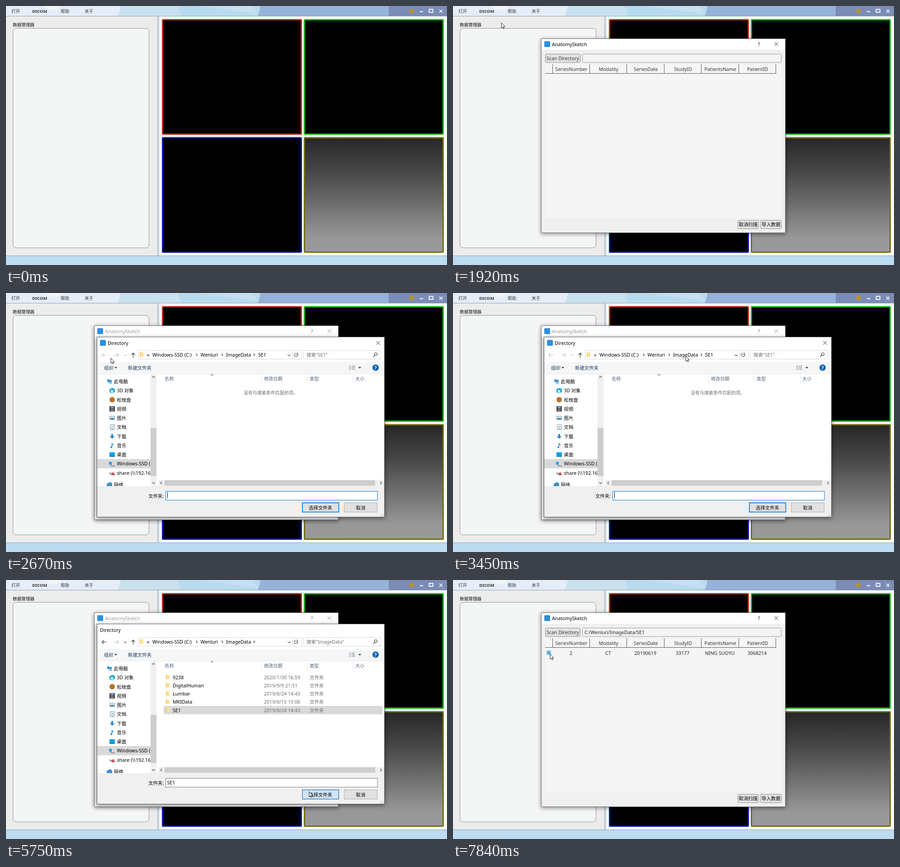
Recreate the animation shown at these times as an HTML page. Size 976x574 px, loop 8 s.

```html
<!DOCTYPE html>
<html lang="zh">
<head>
<meta charset="utf-8">
<title>DICOM</title>
<style>
html, body { margin: 0; height: 100%; overflow: hidden; }
svg { display: block; }
#stage { width: 100%; height: 100%; font: 10.6px "Noto Sans", "Noto Sans CJK SC", "Noto Sans CJK", sans-serif; }
text { white-space: pre; }
.zh { font-size: 10.4px; }
.menu { font-size: 9.6px; font-weight: 500; fill: #333; }
.head { font-size: 10.2px; fill: #4c607a; }
.mid { text-anchor: middle; }
.shadow { filter: drop-shadow(0 2px 5px #0007); }
</style>
</head>
<body>
<svg id="stage" viewBox="0 0 976 574" preserveAspectRatio="none"></svg>
<script>
const LOOP = 8000, STEP = 109, OFFSET = 170;
const USER = 'Wenluri';

// Cursor path: step, x, y
const track = [
  [0, 690, 508], [7, 21, 25], [8, 24, 12], [9, 25, 14], [10, 25, 14], [11, 45, 12], [13, 62, 9], [15, 62, 9],
  [18, 236, 118], [19, 220, 142], [21, 220, 142], [26, 337, 165], [29, 556, 148], [30, 515, 140], [32, 513, 138],
  [33, 513, 138], [38, 444, 288], [40, 444, 288], [47, 640, 458], [48, 671, 469], [51, 671, 469],
  [54, 526, 337], [56, 526, 337], [62, 213, 146], [64, 212, 153], [67, 212, 158], [70, 215, 164], [72, 215, 164]
];

const text = (x, y, s, attrs = '') => `<text x="${x}" y="${y}" ${attrs}>${s}</text>`;
const zh = (x, y, s, attrs = '') => text(x, y, s, `class="zh" ${attrs}`);
const mid = (x, y, s, attrs = '') => text(x, y, s, `class="mid" ${attrs}`);
const rect = (x, y, w, h, fill, attrs = '') => `<rect x="${x}" y="${y}" width="${w}" height="${h}" fill="${fill}" ${attrs}/>`;
const box = (x, y, w, h, fill, stroke, r = 0) => rect(x, y, w, h, fill, `stroke="${stroke}" rx="${r}"`);
const disc = (x, y, r, fill) => `<circle cx="${x}" cy="${y}" r="${r}" fill="${fill}"/>`;
const shape = (d, fill) => `<path d="${d}" fill="${fill}"/>`;
const line = (d, stroke, width = 1) => `<path d="${d}" fill="none" stroke="${stroke}" stroke-width="${width}"/>`;
const close = (x, y, stroke, r = 4, width = 1) =>
  line(`M${x - r} ${y - r}l${2 * r} ${2 * r}m0 ${-2 * r}l${-2 * r} ${2 * r}`, stroke, width);
const chevron = (x, y, angle, stroke = '#555', r = 3) =>
  `<path d="M${-r} ${-r / 2}L0 ${r / 2}L${r} ${-r / 2}" transform="translate(${x} ${y}) rotate(${angle})" fill="none" stroke="${stroke}" stroke-width="1.2"/>`;
const clip = (x, y, w, h, content) =>
  `<svg x="${x}" y="${y}" width="${w}" height="${h}" viewBox="${x} ${y} ${w} ${h}">${content}</svg>`;

const icons = {
  folder: (x, y) => rect(x - 4, y - 5, 8, 10, '#ffe394') + rect(x - 4, y - 5, 2, 10, '#f2cb62'),
  desktop: (x, y) => rect(x - 6, y - 5, 12, 9, '#159fe8') + rect(x - 6, y + 3, 12, 2, '#0d72b8'),
  download: (x, y) => shape(`M${x - 2} ${y - 5}h4v5h3.5l-5.5 5.5l-5.5-5.5h3.5z`, '#2d86d4'),
  doc: (x, y) => box(x - 4, y - 5.5, 9, 11, '#f8fbfd', '#8195a5') + line(`M${x - 2} ${y - 2}h5m-5 3h5m-5 3h5`, '#5b9bc8'),
  picture: (x, y) => box(x - 5.5, y - 4, 11, 8, '#dcebf2', '#8296a3') + rect(x - 4, y, 8, 3, '#3e7f9d'),
  music: (x, y) => disc(x - 2, y + 4, 2, '#198fd9') + line(`M${x - .5} ${y + 4}v-9q1 3 4 4`, '#198fd9', 1.5),
  video: (x, y) => rect(x - 6, y - 6, 12, 12, '#444c58') + rect(x - 3, y - 5, 6, 4, '#7ba5d4') + rect(x - 3, y + 1, 6, 4, '#a37b66'),
  cube: (x, y) => shape(`M${x - 6} ${y - 3}l6-3l6 2v7l-6 3l-6-2z`, '#25aadf') + shape(`M${x - 3} ${y - 1}h5v6l-5-1z`, '#d9f5fd'),
  nut: (x, y) => disc(x, y, 6, '#b8722c'),
  cloud: (x, y) => disc(x, y, 5, '#1279cf'),
  pc: (x, y) => shape(`M${x - 5} ${y - 5}l10 2v6l-10-2z`, '#3a9bdc') + line(`M${x - 2} ${y + 4}l8 1`, '#8b9aa5', 1.5),
  disk: (x, y) => rect(x - 7, y - 4, 6, 6, '#1b9ee5') + line(`M${x - 4} ${y + 3}l5 2h5`, '#888', 2),
  share: (x, y) => line(`M${x - 6} ${y}l6 4h6`, '#89939a', 3) + close(x + 2, y + 2, '#d23324', 2.5, 1.8),
  network: (x, y) => shape(`M${x - 6} ${y - 2}l8-4l4 4v6l-7 2l-5-3z`, '#3c8fc6')
};

function viewport(x, y, color, fill) {
  return rect(x + 1.5, y + 1.5, 307, 253.5, fill, `stroke="${color}" stroke-width="3" rx="1.5"`);
}

function mainWindow(k) {
  const hover = k >= 8 && k <= 10 ? [0, 43] : k >= 11 && k <= 15 ? [45.5, 59] : null;
  const menu = [[12, '打开'], [58, 'DICOM'], [121, '帮助'], [174, '关于']];
  return `<linearGradient id="gray" x2="0" y2="1"><stop stop-color="#272727"/><stop offset=".3" stop-color="#474747"/>
    <stop offset=".87" stop-color="#979797"/><stop offset="1" stop-color="#9a9a9a"/></linearGradient>`
    + rect(0, 0, 976, 574, '#f7fafa') + rect(0, 0, 976, 22, '#e5edf8')
    + shape('M82 0H123Q120 10 100 9Z', '#f2f5f4')
    + shape('M254 0H390V22H247Q252 14 254 0', '#c9e1ef')
    + shape('M380 0H570V22H387Z', '#b8daee') + shape('M430 0H545L559 18Z', '#c5e0f1')
    + shape('M563 0H847V22H557Q562 12 563 0', '#95b2d9') + rect(847, 0, 129, 22, '#7b8cb6')
    + disc(897.5, 11, 5, '#b9961f') + line('M916 12.5h7', '#fff', 2) + close(962.5, 11.5, '#fff', 3.5, 1.5)
    + `<path d="M936.5 7.5h8.500v6.500h-8.500z" fill="none" stroke="#fff" stroke-width="1.800"/>`
    + (hover ? box(hover[0], 2.5, hover[1], 17.5, '#a9d7e6', '#86c3d8', 2) : '')
    + menu.map(([x, s]) => text(x, 15, s, `class="menu" ${s === 'DICOM' ? 'style="font-weight:600;font-size:9.5px"' : ''}`)).join('')
    + rect(0, 23, 335, 530, '#ececec') + line('M0 22.500H976M0 553.500H976', '#8fa5b2')
    + rect(335, 23, 3, 530, '#d5e8f0') + line('M335.500 23V553M338 23V553', '#8b9da7', .8)
    + rect(0, 554, 976, 20, '#bbdcf1')
    + text(15, 45, '数据管理器', 'class="menu" style="fill:#111"')
    + box(15.5, 49.5, 301, 486.500, '#f4f6f5', '#8493a0', 7)
    + viewport(345, 29, '#b92b10', '#000') + viewport(659, 29, '#14b516', '#000')
    + viewport(345, 290.5, '#0a1ba6', '#000') + viewport(659, 290.5, '#75700c', 'url(#gray)');
}

function scanDialog(k) {
  const active = k < 19 || k >= 52, loaded = k >= 52, ink = active ? '#000' : '#999';
  const heads = ['SeriesNumber', 'Modality', 'SeriesDate', 'StudyID', 'PatientsName', 'PatientID'];
  const values = ['2', 'CT', '20190619', '33177', 'NING SUOYU', '3068214'];
  const columnX = i => 262 + i * 82.4;
  let s = rect(195.5, 72.5, 540, 430, '#f0f0f0', 'stroke="#777" class="shadow"') + rect(196, 73, 539, 24, '#fff')
    + rect(202, 78, 13, 13, '#2f8fdc', 'rx="2"') + text(219, 88.5, 'AnatomySketch', `fill="${ink}"`)
    + mid(677, 88.5, '?', `fill="${active ? '#000' : '#666'}"`) + close(715.5, 84.5, active ? '#222' : '#888')
    + box(204.5, 106.5, 77, 18.500, '#e3e3e3', '#8c8c8c', 2) + text(207, 119.5, 'Scan Directory', 'fill="#333"')
    + box(286.5, 106.5, 440, 18.500, '#f4f4f4', '#999', 2)
    + rect(204, 129, 523, 341, '#f5f5f5') + line('M204 149.500H715.500', '#555')
    + heads.map((h, i) => mid(columnX(i), 144, h, 'fill="#333"')).join('');
  for (let i = 0; i < 7; i++) s += line(`M${Math.floor(220 + i * 82.45) + .5} 129V149`, '#555');
  if (loaded) {
    s += text(291, 119.5, `C:/${USER}/ImageData/SE1`, 'fill="#222"')
      + values.map((v, i) => mid(columnX(i) - 1, 165.5, v, 'fill="#222"')).join('')
      + box(207.5, 156.5, 9, 9, '#fff', k >= 64 ? '#5db4e6' : '#999')
      + (k >= 67 ? rect(209, 158, 6, 6, '#259fe0') : '');
  }
  return s + box(630.5, 475, 46, 18.500, '#e3e3e3', '#8c8c8c', 2) + box(681, 475, 46, 18.500, '#e3e3e3', '#8c8c8c', 2)
    + zh(632.5, 488, '取消扫描') + zh(683, 488, '导入数据');
}

function sidebar(k) {
  const quick = k < 22;
  const items = quick
    ? [['desktop', '桌面'], ['download', '下载'], ['doc', '文档'], ['picture', '图片'], ['folder', USER], ['folder', '9238'],
       ['folder', 'figures'], ['folder', 'markdown'], ['folder', 'markdown'], ['cloud', 'TwinShelf'], ['pc', '此电脑'], ['network', '网络']]
    : [['pc', '此电脑'], ['cube', '3D 对象'], ['nut', '松枝盘'], ['video', '视频'], ['picture', '图片'], ['doc', '文档'], ['download', '下载'],
       ['music', '音乐'], ['desktop', '桌面'], ['disk', 'Windows-SSD (C:)'], ['share', String.raw`share (\\192.16`], ['network', '网络']];
  let list = rect(202, quick ? 395 : 368, 118, 20.5, '#d9d9d9');
  items.forEach(([icon, label], i) => {
    const root = quick ? i > 8 : i === 0 || i === 11;
    const y = (quick ? 189 + (i > 8) * 6.8 + (i > 9) * 6.8 + (i > 10) * 7 : 196 + (i > 10) * 6) + i * 20.25;
    list += icons[icon](root ? 229 : 235, y) + text(root ? 238.5 : 245.5, y + 4, label, /[a-z]/.test(label) ? '' : 'class="zh"');
    if (quick && i < 5) list += line(`M308 ${y + 4}l3-3m-2-3l5 5m-3-7l4 4l-4 2`, '#777', 1.2);
  });
  return clip(202, 180, 118, 248, list) + rect(320, 179, 13, 249, '#f0f0f0')
    + (quick ? rect(320, 213, 13, 181, '#cdcdcd') : rect(320, 299, 13, 107, '#cdcdcd'))
    + chevron(326.5, 186, 180) + chevron(326.5, 421, 0);
}

function fileList(k) {
  if (k < 33) return text(526, 224.5, '没有与搜索条件匹配的项。', 'font-size="10" fill="#6d6d6d"');
  const files = [['9238', '2020/1/30 16:59'], ['DigitalHuman', '2019/9/9 21:51'], ['Lumbar', '2019/8/24 14:43'],
    ['MRIData', '2019/8/15 15:06'], ['SE1', '2019/8/24 14:43']];
  const mark = k >= 49 ? '#d9d9d9' : k >= 40 ? '#cce8ff' : k >= 38 ? '#e5f3ff' : 'none';
  return rect(349, 279, 484, 18.5, mark) + files.map(([name, date], i) => {
    const y = 215.5 + i * 18.25;
    return icons.folder(358, y - .5) + text(369, y + 4, name) + text(571, y + 4, date, 'fill="#6d6d6d"') + zh(672, y + 4, '文件夹', 'fill="#6d6d6d"');
  }).join('');
}

function nameField(k) {
  const s = box(353.5, 439.5, 468.5, 19.5, '#fff', k < 40 ? '#0078d7' : '#7a7a7a');
  if (k >= 40) return s + text(356.5, 452.5, 'SE1');
  if (k >= 33) return s + rect(356, 441, 54, 14, '#0078d7') + text(356.5, 452.5, 'ImageData', 'fill="#fff"');
  return s + ((k - 19) % 11 < 6 ? line('M357.500 441V455', '#000') : '');
}

function directoryDialog(k) {
  const opened = k >= 33, closing = k >= 51, pressed = k >= 48;
  const crumbs = [[324, 'Windows-SSD (C:)'], [430.5, USER], [487, 'ImageData']].concat(opened ? [] : [[558, 'SE1']]);
  const arrow = (x, dir, color) => line(`M${x - 5 * dir} 137.500h${10 * dir}m${-4 * dir}-4l${4 * dir} 4l${-4 * dir} 4`, color, 1.2);
  const intro = k === 19 ? 'opacity=".85" transform="translate(519.5 297) scale(.9925) translate(-519.5 -297)"' : '';
  return `<g ${intro}>`
    + rect(201.5, 97.5, 636, 399, '#fff', 'stroke="#666" class="shadow"')
    + (closing ? '' : rect(208, 104, 13, 13, '#2f8fdc', 'rx="2"') + close(823.5, 110.5, '#222'))
    + text(closing ? 208 : 225, 114.5, 'Directory')
    + arrow(217.5, -1, opened ? '#333' : '#c4c4c4') + arrow(244, 1, '#c4c4c4') + chevron(264, 138, 0, opened ? '#555' : '#bbb', 2.5)
    + line('M281.500 143v-10m-4 4l4-4l4 4', '#444', 1.3)
    + box(292.5, 127.5, 362, 19, '#fff', '#d9d9d9') + line('M634.500 128V146', '#d9d9d9') + icons.folder(300, 136.5)
    + (k === 32 ? box(484.5, 128.5, 70, 17, '#e5f3ff', '#b8dcf7') : '')
    + text(312, 140.5, '«') + crumbs.map(([x, s]) => text(x, 141, s)).join('')
    + [422, 478.5, 549.5].map(x => chevron(x, 137, -90, '#444', 2.5)).join('') + chevron(626.5, 138, 0)
    + line('M645.500 135a4 4 0 1 1-4-2m3-1v4h-4', '#555', 1.2)
    + box(658.5, 127.5, 171, 19, '#fff', '#d9d9d9') + zh(665, 141, `搜索"${opened ? 'ImageData' : 'SE1'}"`, 'fill="#6d6d6d"')
    + '<circle cx="818.500" cy="135.500" r="3" fill="none" stroke="#444" stroke-width="1.200"/>' + line('M816.500 137.500l-4 4', '#444', 1.3)
    + rect(202, 153, 635, 26, '#f5f6f7') + line('M202 179.500H837', '#e8eaec')
    + zh(217, 169.5, '组织', 'fill="#1e395b"') + zh(270, 169.5, '新建文件夹', 'fill="#1e395b"')
    + shape('M240 164h6l-3 3.500z', '#333') + shape('M780 164h6l-3 3.500z', '#333')
    + [162, 165.5, 169].map(y => line(`M759.500 ${y}h4m2 0h7`, '#8b9299', 1.5)).join('')
    + disc(818, 165.5, 7, '#0f63b3') + mid(818, 169.5, '?', 'fill="#fff" font-weight="700"')
    + sidebar(k)
    + [[351, '名称'], [571, '修改日期'], [672, '类型'], [773, '大小']].map(([x, s]) => text(x, 194, s, 'class="head"')).join('')
    + [565.5, 667.5, 768.5].map(x => line(`M${x} 180V200`, '#e4e4e4')).join('') + chevron(456, 181.5, 180, '#777')
    + fileList(k)
    + rect(337, 414, 500, 14, '#f0f0f0') + rect(351, 415, 466, 12, '#cdcdcd') + chevron(343.5, 421, 90) + chevron(830, 421, -90)
    + rect(202, 428, 635, 68, '#f0f0f0') + zh(315, 453.5, '文件夹:') + nameField(k)
    + rect(656, 465, 80.5, 20.5, pressed ? '#cce4f7' : '#e1e1e1', `stroke="${closing ? '#005499' : '#0078d7'}" stroke-width="${pressed ? 1 : 1.7}"`)
    + box(748.5, 465, 73, 20.5, '#e1e1e1', '#adadad')
    + zh(670, 479.5, '选择文件夹') + zh(774.5, 479.5, '取消')
    + line('M828 495h7m-4.500-2.500h4.500m-2-2.500h2', '#aaa', 1.2).replace('/>', ' stroke-dasharray="1.500 1"/>')
    + '</g>';
}

function cursor(k) {
  if (k < 0) return '';
  const i = track.findIndex(p => p[0] >= k);
  const [k1, x1, y1] = track[i], [k0, x0, y0] = track[Math.max(0, i - 1)];
  const f = k1 > k0 ? (k - k0) / (k1 - k0) : 1, ease = f * f * (3 - 2 * f);
  const x = x0 + (x1 - x0) * ease, y = y0 + (y1 - y0) * ease;
  if (k >= 13 && k <= 15)
    return `<g transform="translate(66 13) rotate(${(k - 14) * 45})" fill="none" stroke-width="3.500">
      <circle r="5.200" stroke="#1f8fe8"/><path d="M-5.200 0A5.200 5.200 0 0 1 0-5.200" stroke="#7cc4f2"/></g>`;
  return `<path d="M0 0V11.500L2.700 9L4.600 13L6.200 12.200L4.400 8.400H8Z" transform="translate(${x} ${y})" fill="#fff" stroke="#111" stroke-width=".9"/>`;
}

const stage = document.getElementById('stage');
let shown = null;

function draw() {
  const k = Math.floor((performance.now() % LOOP - OFFSET) / STEP);
  if (k !== shown) {
    shown = k;
    stage.innerHTML = mainWindow(k)
      + (k >= 16 ? scanDialog(k) : '')
      + (k >= 19 && k < 52 ? directoryDialog(k) : '')
      + cursor(k);
  }
  requestAnimationFrame(draw);
}
draw();
</script>
</body>
</html>
```
